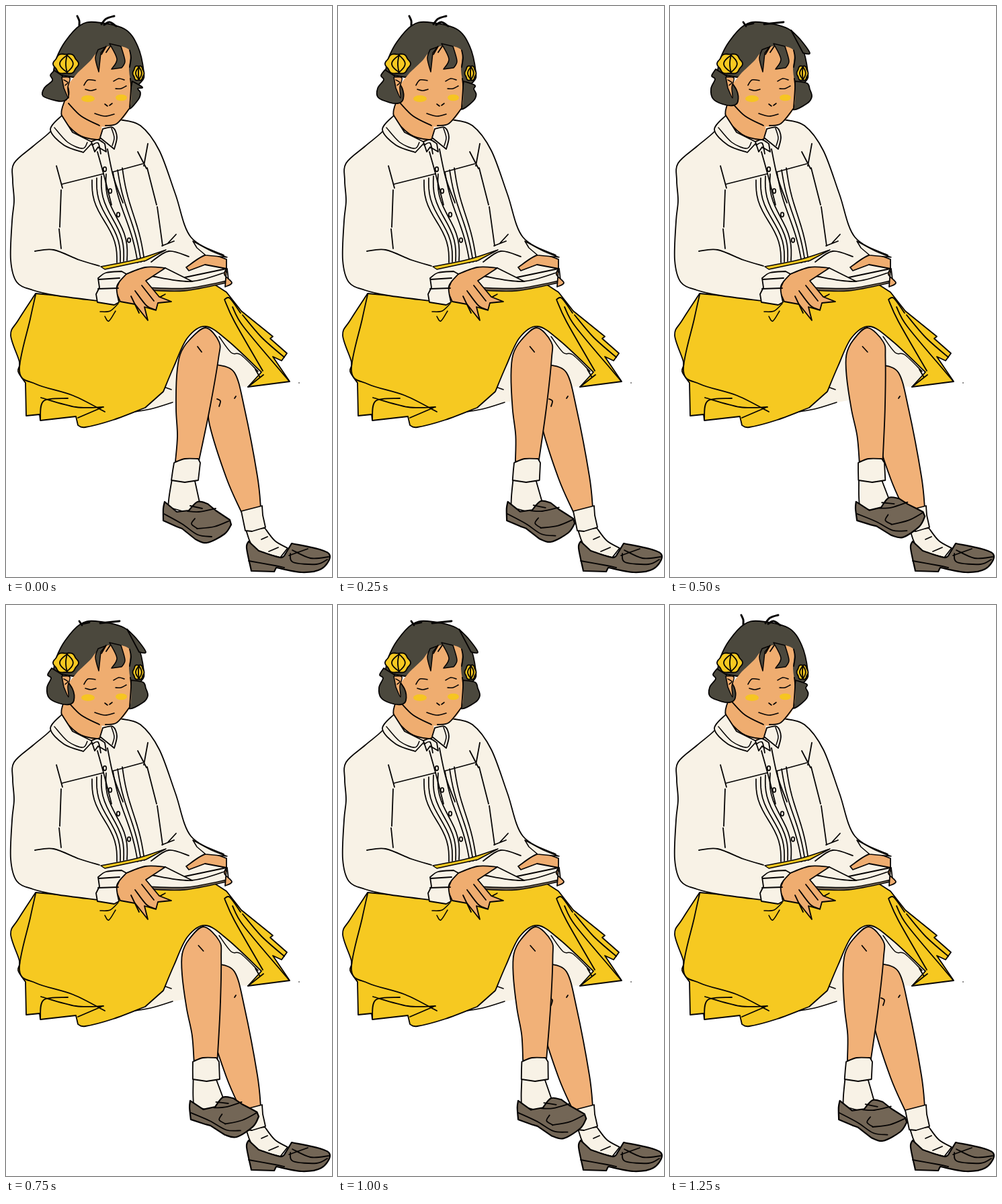
Recreate the animation shown at these times as an HTML page with a canvas. Size 485 by 850 pixels, loop 1500 ms.

```html
<!DOCTYPE html>
<html lang="en">
<head>
<meta charset="utf-8">
<title>Reading girl</title>
<style>
html, body { margin: 0; width: 100%; height: 100%; overflow: hidden; background: #fff; }
canvas { display: block; width: 485px; height: 850px; }
</style>
</head>
<body>
<canvas id="stage" width="485" height="850"></canvas>
<script>
const ctx = document.getElementById('stage').getContext('2d');
const STEP = 250;
const SWING = [0, 0.4, 1, 0.93, 0.78, 0.4];
const HAIR = '#4b483d', FACE = '#efad70', SKIN = '#f1b178', YELLOW = '#f6c921',
      CREAM = '#f8f2e6', SHOE = '#736656', INK = '#050303';

// "x,y x,y" is a smooth run; "|" makes a corner between runs.
const parse = text => text.split('|').map(run =>
  run.trim().split(/\s+/).map(s => s.split(',').map(Number)));

function trace(text) {
  parse(text).forEach((p, n) => {
    ctx[n ? 'lineTo' : 'moveTo'](...p[0]);
    for (let i = 0; i < p.length - 1; i++) {
      const a = p[i - 1] || p[i], b = p[i], c = p[i + 1], d = p[i + 2] || c;
      ctx.bezierCurveTo(b[0] + (c[0] - a[0]) / 6, b[1] + (c[1] - a[1]) / 6,
                        c[0] - (d[0] - b[0]) / 6, c[1] - (d[1] - b[1]) / 6, c[0], c[1]);
    }
  });
}

function paint(color, width) {
  ctx.fillStyle = color;
  ctx.fill();
  ctx.lineWidth = width;
  if (width) ctx.stroke();
}

function fill(text, color, width = 1.8) {
  ctx.beginPath();
  trace(text);
  ctx.closePath();
  paint(color, width);
}

function lines(list, width = 1.8) {
  ctx.lineWidth = width;
  ctx.beginPath();
  list.forEach(trace);
  ctx.stroke();
}

function oval(x, y, rx, ry, color, width = 0) {
  ctx.beginPath();
  ctx.ellipse(x, y, rx, ry, 0, 0, Math.PI * 2);
  paint(color, width);
}

// A line whose point at u = 0..1 comes from a formula.
function plot(at, n = 16) {
  ctx.beginPath();
  for (let i = 0; i <= n; i++) ctx.lineTo(...at(i / n));
}

function mix(from, to, k) {
  const b = parse(to)[0];
  return parse(from)[0].map(([x, y], i) =>
    `${x + (b[i][0] - x) * k},${y + (b[i][1] - y) * k}`).join(' ');
}

function slip() {
  fill('178,606 215,600 248,590 | 272,586 300,560 | 343,566 360,567 | 380,546 316,484 | 285,482 240,550 205,598', CREAM, 0);
  lines(['178,606 215,600 248,590', '232,566 246,571', '317,492 335,516 349,519 375,544'], 1.5);
}

function backLeg() {
  fill('314,534 340,546 355,600 374,700 379,747 | 350,753 328,703 303,624 301,590', SKIN);
  lines(['314,585 319,588 317,596', '340,584 342,581']);
  fill('357,780 370,808 408,821 | 419,807 400,796 385,777', CREAM);
  fill('350,752 381,744 | 382,758 386,776 | 366,782 356,781', CREAM);
  lines(['380,794 389,790', '391,812 405,806']);
  fill('361,797 358,807 365,841 | 399,842 | 402,836 440,843 469,838 482,820 470,810 425,800 | 416,815 408,821 376,811', SHOE, 2.2);
  lines(['361,826 400,833 414,836', '421,818 449,808', '423,815 427,828 462,831 478,824', '426,810 453,822 480,820']);
}

// The leg leans from the knee down; the shoe turns about its heel.
function frontLeg(s) {
  const lean = 0.165 * s, knee = 498;
  ctx.save();
  ctx.transform(1, 0, lean, 1, -lean * knee, 0);
  fill('252,678 255,640 253,600 254,550 259,519 273,497 297,479 317,500 316,525 303,600 287,677', SKIN);
  lines(['285,507 291,515']);
  fill('247,704 243,728 241,746 | 273,755 288,739 | 281,707', CREAM);
  fill('250,680 266,674 286,674 | 289,680 286,706 | 266,709 246,706 | 248,692', CREAM);
  ctx.restore();

  ctx.save();
  ctx.translate(234 + 42 * s, 748);
  ctx.rotate(-0.12 * s * s);
  ctx.translate(-234, -748);
  fill('236,738 234,748 234,766 | 254,775 262,778 | 282,794 299,799 325,786 335,772 | 333,765 312,751 | 300,741 285,738 272,751 | 254,753', SHOE, 2.2);
  lines(['235,756 262,771 285,787 306,790', '270,752 287,753 312,748', '274,744 292,748', '281,763 276,771 285,778', '284,778 310,775 333,766']);
  ctx.restore();
}

function skirt() {
  fill('44,428 18,468 7,490 20,530 18,544 29,561 | 30,610 | 50,608 51,617 | 104,611 | 107,624 118,627 160,616 207,598 | 234,574 250,536 270,494 297,477 331,499 380,545 | 360,567 | 422,559 | 397,522 | 410,528 418,517 | 393,495 397,492 | 350,454 328,426 | 300,408 134,436', YELLOW);
  lines(['44,430 36,466 20,543 45,563 100,580 147,604', '51,616 56,588 92,584', '52,583 104,597 145,597', '107,613 142,598',
         '325,437 340,470 382,543', '325,437 333,435 349,457', '337,448 353,477 409,544 421,558', '352,460 380,493 414,523',
         '371,541 378,553', '383,549 360,567']);
  lines(['167,443 155,454 140,455', '147,462 153,469 163,454', '220,428 226,434 237,429'], 1.5);
}

function pleats(x, y, count, wave) {
  for (let i = 0; i < count; i++) {
    const top = y - 3 * i, end = 382 - i;
    plot(u => [x + i * (7 - 2 * u) + 37 * u - wave * Math.sin(2 * Math.PI * u), top + (end - top) * u]);
    ctx.stroke();
  }
}

function blouse() {
  const left = '82,165 66,187 40,209 12,234 10,260 12,290 9,320 7,378 16,411 40,423 75,431 136,439';
  const right = '324,371 275,344 252,280 228,215 200,178 168,169';
  fill(`${left} | 170,435 260,402 290,385 | ${right}`, CREAM, 0);
  lines([left, right, '75,238 84,271', '82,274 80,329', '79,332 82,361', '43,365 71,363 109,378 139,387',
         '84,265 144,250', '159,247 203,235', '196,217 209,242', '211,205 205,238', '210,241 224,296', '225,299 233,357',
         '241,353 253,340', '232,357 250,350', '136,217 146,253 157,296', '151,213 160,255 174,293']);
  ctx.lineWidth = 1.7;
  pleats(128, 259, 4, 6);
  pleats(159, 247, 3, 2);
  for (let i = 0; i < 4; i++) {
    oval(147 + 6 * i + 2 * i * i, 243 + 31 * i + 1.4 * i * i, 2.3, 3.3, CREAM, 1.7);
  }
  fill('141,388 195,377 238,363 | 208,379 147,392', YELLOW, 1.5);
}

function bookAndHands() {
  fill('216,381 242,365 272,373 | 328,392 332,408 | 262,423 207,420 205,400', CREAM, 0);
  fill('208,419 270,420 333,408 | 333,411 266,424 211,423', SHOE, 1.4);
  lines(['216,381 242,365 272,373', '237,390 277,410', '266,404 328,391', '216,402 275,410 328,396', '329,391 331,408']);
  fill('268,389 299,370 328,377 | 328,391 | 296,385 272,394', FACE);
  fill('328,391 325,400 336,412 326,418', FACE);
  fill('278,350 306,365 329,374 | 297,371 284,360', CREAM, 1.5);

  fill('172,402 207,389 237,390 | 208,409 | 228,433 246,440 | 226,442 | 223,453 206,448 | 211,468 | 192,444 | 170,440 163,424', FACE);
  lines(['192,424 209,446 222,452', '202,416 220,439', '186,432 198,457']);
  fill('137,405 149,397 172,395 | 179,399 165,417 168,441 | 161,445 136,441 | 134,429 139,419', CREAM);
  lines(['138,407 169,405', '137,421 167,420']);
}

function collar() {
  fill('83,163 66,184 86,207 115,218 | 129,203 | 99,188', CREAM);
  lines(['72,181 92,203 114,212 121,203'], 1.5);
  fill('144,183 159,181 165,195 161,213 | 140,196', CREAM);
  lines(['157,182 161,196 158,208'], 1.5);
  fill('127,202 137,199 147,205 | 149,217 137,210 | 132,217', CREAM);
  lines(['128,207 137,204 141,220'], 1.8);
}

// A lobed bud with meridian creases.
function blossom(x, y, rx, ry) {
  plot(u => {
    const a = 2 * Math.PI * u, r = 1 + 0.06 * Math.cos(6 * a);
    return [x + rx * r * Math.cos(a), y + ry * r * Math.sin(a)];
  }, 48);
  paint(YELLOW, 1.8);
  for (const k of [-0.6, -0.1, 0.5]) {
    plot(u => [x + rx * k * Math.sin(Math.PI * u) + rx * 0.1, y + ry * (1.7 * u - 0.85)]);
    ctx.stroke();
  }
}

function hairTop(settled) {
  fill('70,101 75,78 88,53 110,29 133,24 176,34 196,60 205,98 202,112 185,120 150,95 100,106', HAIR);
  if (settled) {
    fill('180,36 194,50 208,70 198,70', HAIR);
    lines(['113,30 109,24', '114,28 124,26', '140,27 169,24'], 2.8);
  } else {
    lines(['109,29 109,22 106,15', '142,27 149,19 161,15', '146,28 154,24 164,30'], 3);
  }
}

function head(s) {
  const fall = Math.min(1, 1.28 * s);
  fill('88,137 83,164 105,190 135,202 | 143,196 142,174', FACE, 0);
  lines(['88,139 83,164 107,191 135,199 143,194']);
  collar();
  hairTop(s > 0.5);
  fill(mix('188,112 203,121 196,123 200,129 197,139 183,153 184,130',
           '186,112 204,115 208,124 211,135 204,145 183,154 184,132', fall), HAIR);
  fill('107,99 125,82 136,69 157,59 184,66 183,95 186,121 184,152 166,174 138,179 108,161 91,136 91,118', FACE, 0);
  lines(['93,145 112,164 139,178', '148,178 165,175 184,152', '185,108 186,121 184,151']);
  fill('137,65 133,78 138,98 | 141,70 148,61', HAIR, 1.5);
  fill('154,56 165,79 157,94 | 172,92 177,82 171,60', HAIR, 1.5);
  fill('170,59 184,66 183,93 | 198,88 182,52', HAIR, 0);
  lines(['142,72 149,60', '149,69 155,60', '184,66 186,77 184,91']);

  fill(mix('72,96 66,103 69,111 57,122 55,134 75,141 87,141 93,134 92,120 84,104',
           '68,94 62,104 67,109 61,123 64,138 78,146 94,148 101,142 99,125 84,104', fall), HAIR);
  fill('83,106 95,107 92,121 93,137 86,122', FACE, 1.5);
  lines(['86,110 92,114 88,118'], 1.5);
  blossom(89, 86, 18, 15);
  blossom(197, 100, 8, 11);

  oval(122, 138, 10, 5, '#f6c522');
  oval(171.5, 136.5, 8.5, 4.8, '#f6c522');
  lines(['116,118 122,110 133,111', '160,112 168,108 176,110', '118,124 126,126 134,124', '163,123 171,123 179,119',
         '147,146 151,149', '154,148 158,145', '132,160 147,164 161,161'], 1.6);
}

function draw(s) {
  ctx.fillStyle = '#fff';
  ctx.fillRect(0, 0, 485, 850);
  ctx.strokeStyle = INK;
  ctx.lineCap = ctx.lineJoin = 'round';
  slip();
  backLeg();
  frontLeg(s);
  skirt();
  blouse();
  bookAndHands();
  head(s);
  oval(436, 561, 0.8, 0.8, INK);
}

const start = performance.now();
function tick(now) {
  draw(SWING[Math.floor(Math.max(0, now - start) / STEP) % SWING.length]);
  requestAnimationFrame(tick);
}
tick(start);
</script>
</body>
</html>
```
